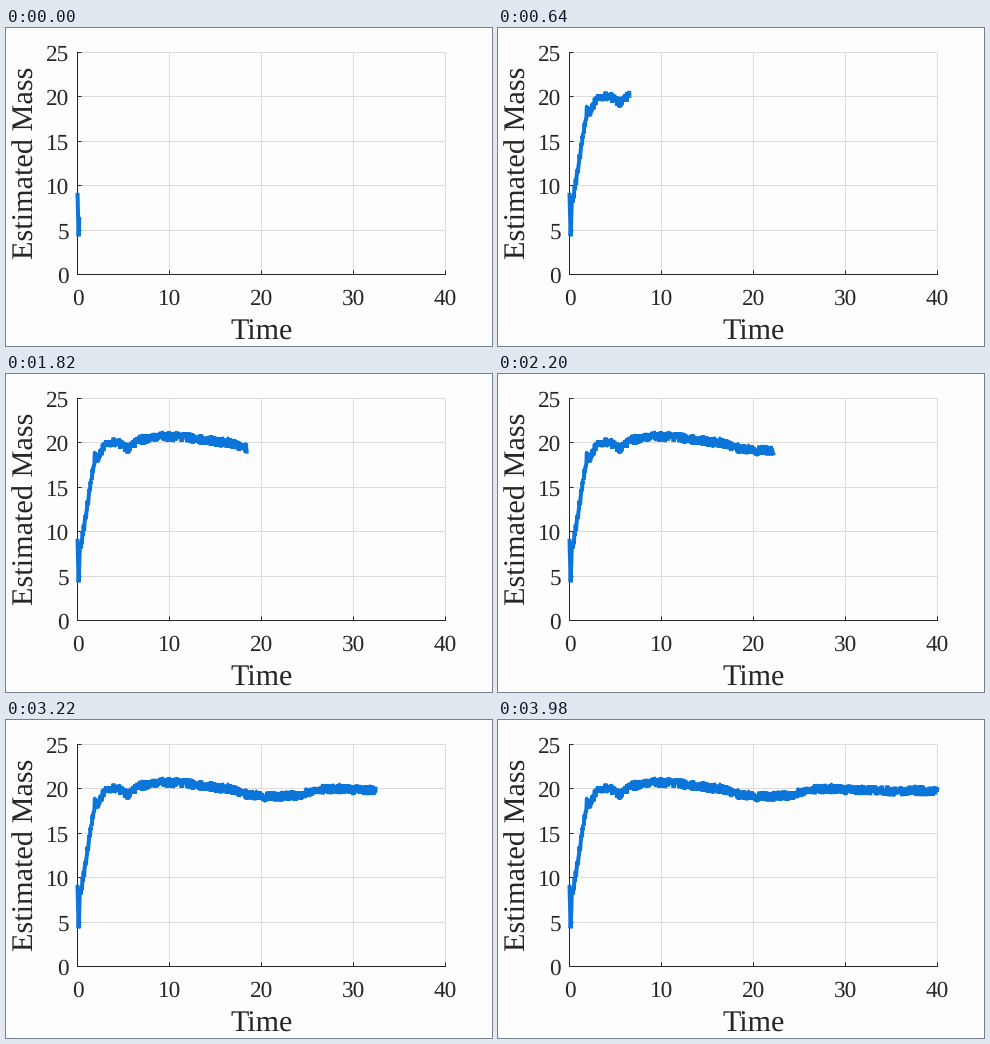
These frames come from a looping animation (486 by 318 pixels, 4 s). A matplotlib script:

```python
import numpy as np
import matplotlib.pyplot as plt
from matplotlib.animation import FuncAnimation

W, H, DPI = 486, 318, 100
PX = 72 / DPI  # one pixel in points
FRAMES, STEP = 200, 5
INK, GRID, BLUE, PAPER = "#262626", "#dbdbdb", "#0b75d9", "#fdfdfd"

plt.rcParams.update({"font.family": "Liberation Serif",
                     "text.hinting": "none",
                     "path.simplify": False})


def to_x(t):
    return 71.5 + 9.2 * t


def to_y(v):
    return 246.5 - 8.88 * v


def pixel(p):
    return np.floor(p) + 0.5


def bump(t, center, width, height, power=2):
    return height * np.exp(-np.abs((t - center) / width) ** power)


def trend(t):
    # Start-up spike and climb, then slow drift around 20
    climb = np.interp(t, [0, 0.12, 0.2, 0.26, 0.35, 1.9, 2.25, 3],
                      [9.2, 4.3, 6.5, 8.9, 8, 18.5, 18.1, 20])
    drift = (19.9 - 0.12 * np.tanh((t - 30) / 2)
             + bump(t, 5.5, 0.7, -0.85)
             + bump(t, 10.2, 4, 0.7)
             + bump(t, 21.3, 4, -0.85, 4))
    return np.where(t < 3, climb, drift)


rng = np.random.default_rng(4)
time = np.linspace(0, 40, FRAMES * STEP + 1)
noise = rng.uniform(-0.6, 0.6, time.size) * (time > 0.3)
xs, ys = to_x(time), to_y(trend(time) + noise)

fig = plt.figure(figsize=(W / DPI, H / DPI), dpi=DPI, facecolor=PAPER)
ax = fig.add_axes([0, 0, 1, 1])
ax.set(xlim=(0, W), ylim=(H, 0))
ax.axis("off")


def rule(x0, y0, x1, y1, color):
    ax.plot([x0, x1], [y0, y1], color=color, lw=PX, solid_capstyle="butt",
            snap=False, zorder=1 if color == GRID else 2)


def label(x, y, text, size, **kw):
    ax.text(x, y, text, size=size * PX, color=INK, va="baseline", **kw)


left, right, bottom, top = to_x(0), to_x(40), to_y(0), to_y(25)

for t in range(0, 41, 10):
    x = pixel(to_x(t))
    rule(x, bottom, x, top, GRID)
    rule(x, bottom, x, bottom - 4, INK)
    label(x, 277, str(t), 23.3, ha="center")

for v in range(0, 26, 5):
    y = pixel(to_y(v))
    rule(left, y, right, y, GRID)
    rule(left, y, left + 4, y, INK)
    label(63, y + 8.5, str(v), 23.3, ha="right")

rule(left, bottom + 0.5, left, top - 0.5, INK)
rule(left - 0.5, bottom, right + 0.5, bottom, INK)
label(255.5, 312, "Time", 30, ha="center")
label(28, 135, "Estimated Mass", 30.2, ha="center", rotation=90,
      rotation_mode="anchor")

curve, = ax.plot([], [], color=BLUE, lw=4 * PX, zorder=3,
                 solid_joinstyle="bevel", solid_capstyle="butt")


def draw(i):
    n = (i + 1) * STEP + 1
    curve.set_data(xs[:n], ys[:n])
    return curve,


anim = FuncAnimation(fig, draw, frames=FRAMES, interval=20, repeat=True,
                     repeat_delay=0)
plt.show()
```
